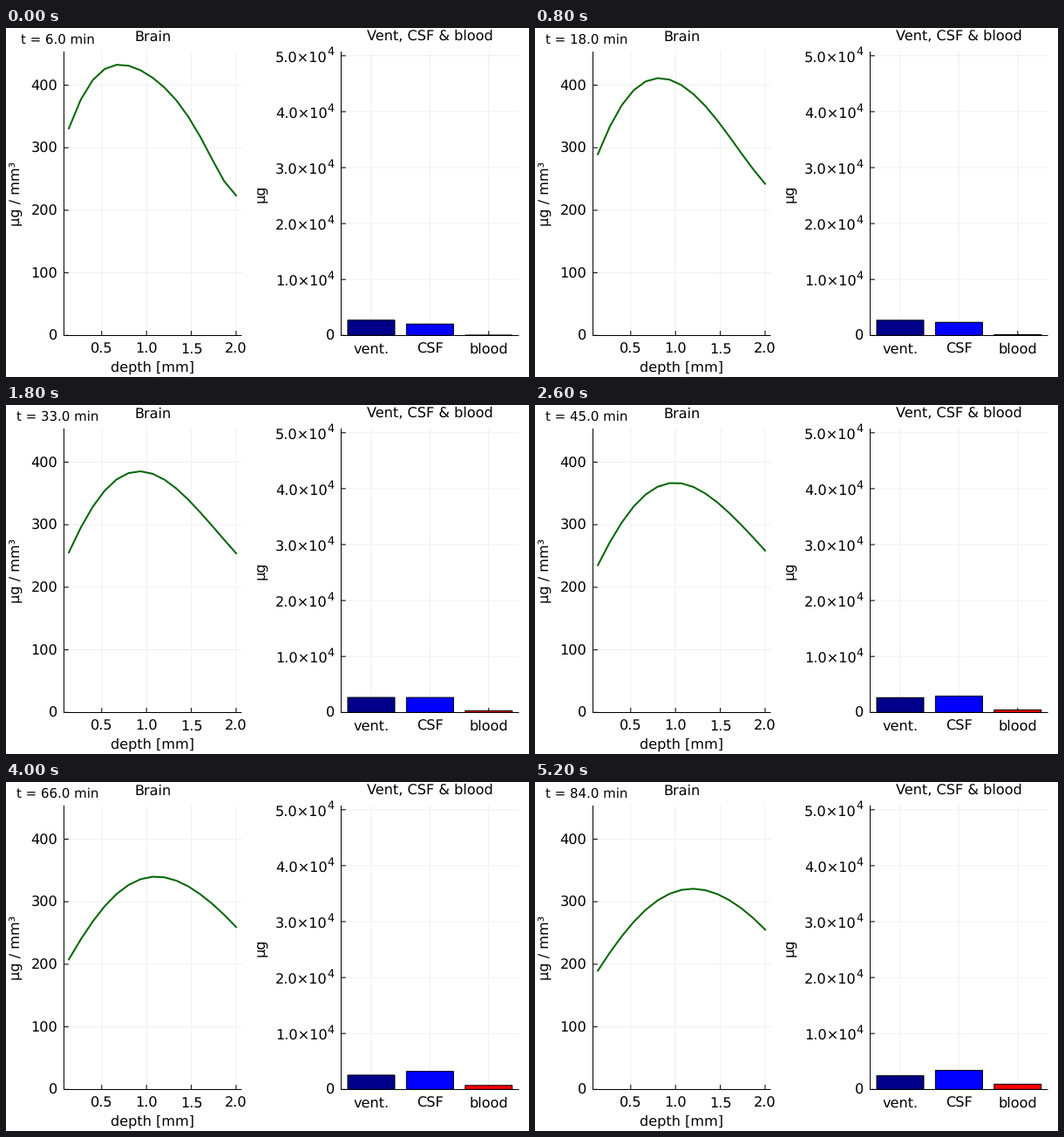
Write a matplotlib script that moves like this. It is 600 px wide and 400 px high and loops after 5.4 s.

```python
import numpy as np
import matplotlib.pyplot as plt
from matplotlib.animation import FuncAnimation
from matplotlib.patches import Rectangle

W, H, DPI = 600, 400, 100
FRAMES, STEP_MS = 27, 200
BASE, TOP = 352.3, 27
LEFT, RIGHT = (66.5, 270.5), (384.5, 588.5)
START, MINUTES = 6, 3  # first time shown, minutes per frame

plt.rcParams["font.family"] = "DejaVu Sans"
plt.rcParams["text.hinting"] = "none"

# Tissue model: 15 cells with diffusion, a slow drift, and loss at both ends
CELLS, DX, SUBSTEPS = 15, 2 / 15, 12
DIFFUSION, DRIFT = 0.00432, 0.00217
LOSS_SURFACE, AMBIENT, LOSS_DEEP = 0.00505, 69, 0.00476
START_CONC = [331, 408, 433, 423, 397, 349, 281.5, 223.6]


def start_profile():
    shape = np.polyfit(np.linspace(-1, 1, len(START_CONC)), START_CONC, 6)
    return np.polyval(shape, np.linspace(-1, 1, CELLS))


def advance(u, dt):
    inner = DRIFT * (u[:-1] + u[1:]) / 2 - DIFFUSION * np.diff(u) / DX
    surface = -LOSS_SURFACE * (u[0] - AMBIENT)
    flux = np.concatenate([[surface], inner, [LOSS_DEEP * u[-1]]])
    return u - dt * np.diff(flux) / DX


def simulate():
    history = [start_profile()]
    for _ in range(FRAMES - 1):
        u = history[-1]
        for _ in range(SUBSTEPS):
            u = advance(u, MINUTES / SUBSTEPS)
        history.append(u)
    return history


def masses(t):
    vent = 2725 - 0.04 * t**2
    csf = 1870 + 28.2 * t - 0.118 * t**2
    blood = 12.5 * t - 120 * (1 - np.exp(-t / 12))
    return vent, csf, blood


def depth_x(d):
    return 264 + (d - 2) * 102.8


def conc_y(c):
    return BASE - 0.717 * c


def mass_y(m):
    return BASE - 64.1e-4 * m


fig = plt.figure(figsize=(W / DPI, H / DPI), dpi=DPI, facecolor="white")
ax = fig.add_axes([0, 0, 1, 1])
ax.set(xlim=(0, W), ylim=(H, 0))
ax.axis("off")


def line(xs, ys, color="black", px=1, z=2, **kw):
    return ax.plot(xs, ys, color=color, lw=px * 72 / DPI, zorder=z,
                   snap=False, **kw)[0]


def label(x, y, s, px=16.1, ha="center", **kw):
    return ax.text(x, y, s, fontsize=px * 72 / DPI, ha=ha, va="baseline", **kw)


def side_label(x, y, s):
    label(x, y, s, rotation=90, rotation_mode="anchor")


def panel(span, xticks, yticks):
    x0, x1 = span
    for x in xticks:
        line([x, x], [TOP, BASE], "#f0f0f0", z=1)
        line([x, x], [BASE, BASE - 4.8])
    for y in yticks:
        line([x0, x1], [y, y], "#f0f0f0", z=1)
        line([x0, x0 + 4.8], [y, y])
    line([x0, x0], [TOP, 353], solid_capstyle="butt")
    line([x0 - 0.5, x1], [352.5, 352.5], solid_capstyle="butt")


# Left panel
depths = np.array([0.5, 1, 1.5, 2])
concs = np.arange(0, 401, 100)
panel(LEFT, depth_x(depths), conc_y(concs))
for d in depths:
    label(depth_x(d), 372.5, f"{d:.1f}")
for c in concs:
    label(59.5, conc_y(c) + 5.9, f"{c}", ha="right")
label(168.2, 14.5, "Brain")
label(168.4, 393.5, "depth [mm]")
side_label(16.3, 189.7, "µg / mm³")

# Right panel
centers = 419 + 67.4 * np.arange(3)
panel(RIGHT, centers, mass_y(np.arange(6) * 1e4))
for x, name in zip(centers, ["vent.", "CSF", "blood"]):
    label(x, 372.5, name)
label(377.2, BASE + 5.9, "0", ha="right")
for k in range(1, 6):
    y = mass_y(k * 1e4)
    label(368.9, y + 8, f"{k}.0×10", ha="right")
    label(368, y - 0.4, "4", px=12.8, ha="left")
label(486.7, 14.5, "Vent, CSF & blood")
side_label(297, 189.3, "µg")

# Moving parts
clock = label(59.2, 17.3, "", px=15)
history = simulate()
curve = line(depth_x(DX * np.arange(1, CELLS + 1)), conc_y(history[0]),
             "#006400", px=2, z=3)

clip = Rectangle((RIGHT[0], TOP), RIGHT[1] - RIGHT[0], 353 - TOP,
                 transform=ax.transData)
bars = []
for x, color in zip(centers, ["#00008b", "#0000ff", "#ff0000"]):
    bar = Rectangle((x - 27, BASE), 54, 0, fc=color, ec="black",
                    lw=72 / DPI, snap=False, zorder=3)
    ax.add_patch(bar)
    bar.set_clip_path(clip)
    bars.append(bar)


def update(n):
    t = START + MINUTES * n
    clock.set_text(f"t = {t:.1f} min")
    curve.set_ydata(conc_y(history[n]))
    for bar, m in zip(bars, masses(t)):
        bar.set_height(mass_y(m) - BASE)
    return [clock, curve, *bars]


anim = FuncAnimation(fig, update, frames=FRAMES, interval=STEP_MS, repeat=True)
plt.show()
```
